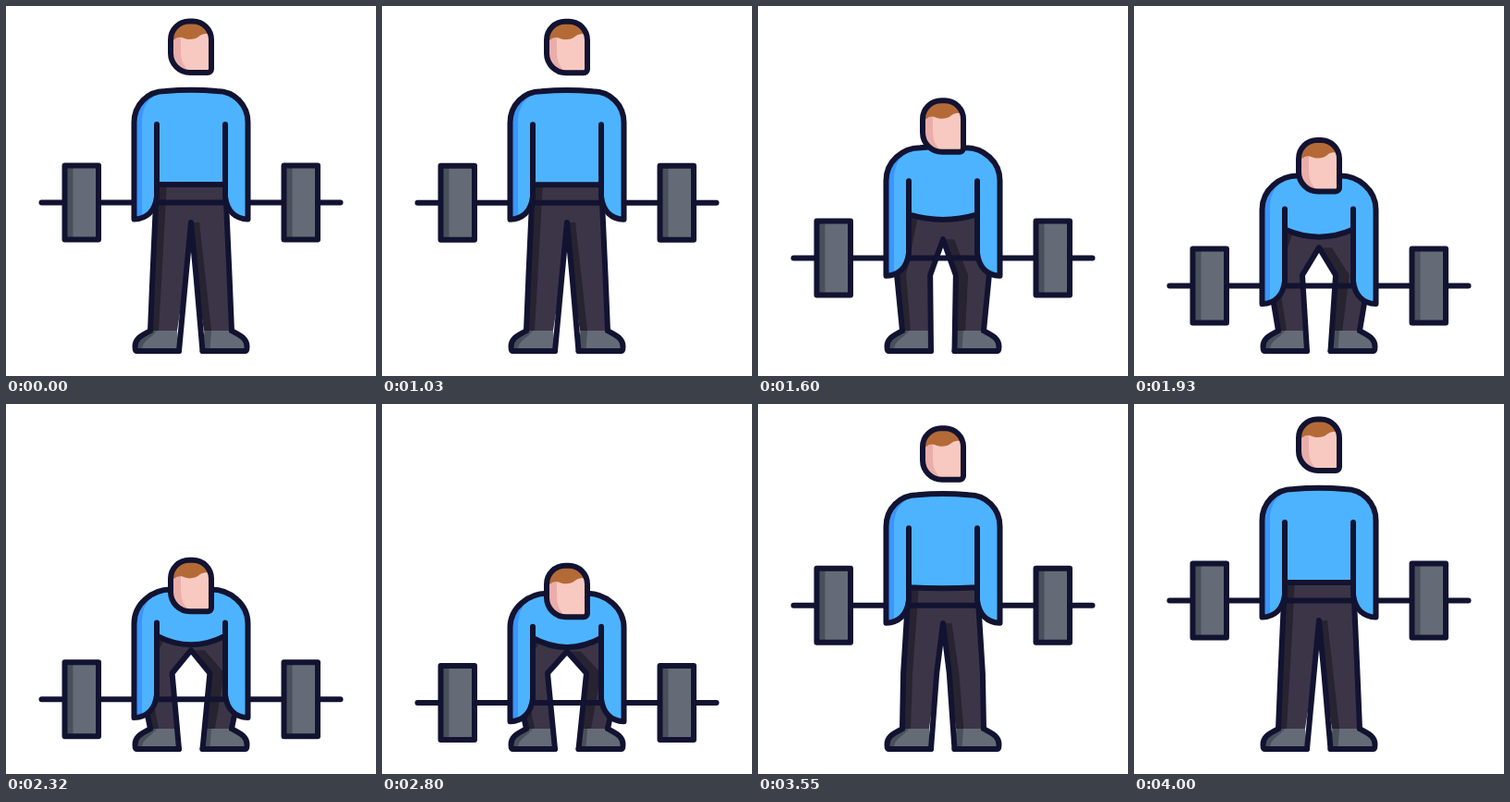
These frames come from a looping animation (400 px wide and 400 px high, 4.03 s). An HTML page:

```html
<!DOCTYPE html>
<html lang="en">
<head>
<meta charset="utf-8">
<title>Deadlift</title>
<style>
  html, body { margin: 0; width: 100%; height: 100%; overflow: hidden; background: #fff; }
  svg { display: block; width: 100vw; height: 100vh; }
  .ink { fill: none; stroke: #121331; stroke-width: 6; stroke-linecap: round; stroke-linejoin: round; }
  .trousers { fill: #3c3548; }
  .fold { fill: #272330; }
  .metal { fill: #656b76; }
  .metal-dark { fill: #4a505a; }
</style>
</head>
<body>
<svg viewBox="0 0 400 400">
  <defs>
    <g id="plate">
      <path class="metal" d="M0 0H36.5V80H0Z"/>
      <path class="metal-dark" d="M0 0H9V80H0Z"/>
      <path class="ink" d="M0 0H36.5V80H0Z"/>
    </g>
    <path id="skull" d="M198 16.500h4a20 20 0 0 1 20 20v31.500a4 4 0 0 1-4 4h-19a21 21 0 0 1-21-21v-14.500a20 20 0 0 1 20-20Z"/>
    <clipPath id="headClip"><use href="#skull"/></clipPath>
  </defs>

  <path id="legs" class="trousers"/>
  <path id="folds" class="fold"/>
  <path class="metal" d="M156 351C147 356 139.500 359 139.500 368Q139.500 373 141 373H187L185 351ZM244 351C253 356 260.500 359 260.500 368Q260.500 373 259 373H212.500L214.500 351Z"/>
  <path class="metal-dark" d="M156 351C147 356 139.500 359 139.500 368V373H147C147 361 157 360 163 351ZM214.500 351H222L220.500 373H212.500Z"/>
  <path id="legLines" class="ink"/>
  <path class="ink" d="M156 351C147 356 139.500 359 139.500 368Q139.500 373 141 373H187M244 351C253 356 260.500 359 260.500 368Q260.500 373 259 373H212.500"/>

  <g id="barbell">
    <path class="ink" d="M38.500 212.500H361.500"/>
    <use href="#plate" x="63.500" y="172.500"/>
    <use href="#plate" x="300.500" y="172.500"/>
  </g>

  <g id="body">
    <path id="shirt" fill="#4db3ff"/>
    <path id="shirtShade" fill="#3b95ff"/>
    <path id="shirtLine" class="ink"/>
  </g>

  <g id="head">
    <g clip-path="url(#headClip)">
      <path fill="#f8c9c0" d="M175 13H225V75H175Z"/>
      <path fill="#e9aeaa" d="M175 13H189V50Q189 65 200 72H175Z"/>
      <path fill="#b46a36" d="M175 13H225V33C218 29 213 29 209 32.500C203 37.500 196 36.500 190 34Q185 33 181 37L175 40Z"/>
    </g>
    <use href="#skull" class="ink"/>
  </g>
</svg>
<script>
const LOOP = 4030;
const el = Object.fromEntries([...document.querySelectorAll('svg [id]')].map(n => [n.id, n]));
const draw = (id, d) => el[id].setAttribute('d', d);
const shift = (id, y) => el[id].setAttribute('transform', `translate(0 ${y.toFixed(3)})`);
const mirror = x => 400 - x;

// Cubic Bezier easing with flat ends; x1 and x2 are the handle lengths.
function ease(u, x1, x2) {
  if (u <= 0) return 0;
  if (u >= 1) return 1;
  let lo = 0, hi = 1, s = 0.5;
  for (let i = 0; i < 24; i++) {
    s = (lo + hi) / 2;
    const x = 3 * (1 - s) ** 2 * s * x1 + 3 * (1 - s) * s * s * x2 + s ** 3;
    if (x < u) lo = s; else hi = s;
  }
  return s * s * (3 - 2 * s);
}

const lowering = t => ease((t - 1000) / 1700, 0.25, 0.3);
const lifting = t => ease((t - 2760) / 960, 0.626, 0.538);

function drawLegs(bend) {
  const crotch = 234 + 33.5 * bend;
  const hip = 190 + 60 * bend;
  const inner = 194.6 - 15.6 * bend;
  const outer = 158.5 - 15.5 * bend;
  const leftOut = `163 ${hip}L${outer} 291L156 351`;
  const rightOut = `237 ${hip}L${mirror(outer)} 291L244 351`;
  const leftIn = `187 373L${inner} 291L200 ${crotch}`;
  const rightIn = `L${mirror(inner)} 291L212.5 373`;

  draw('legs', `M${leftOut}L185 351L${inner} 291L200 ${crotch}L${mirror(inner)} 291L214.5 351H244L${mirror(outer)} 291L237 ${hip}Z`);
  draw('folds', `M${leftOut}H165L${outer + 10} 291L174 ${hip}Z
    M200 ${crotch}H${209 + 6 * bend}L${mirror(inner) + 10 + 6 * bend} 291L${222 + 4 * bend} 351H214L${mirror(inner)} 291Z`);
  draw('legLines', `M${leftOut}M${leftIn}${rightIn}M${rightOut}`);
}

function drawBody(bend, waist) {
  const drop = 113 * bend;
  const hem = 193 + 60 * waist - drop;
  const dip = 193 + 80 * waist - drop;
  // Shoulders grow rounder as the body leans forward.
  const arm = 126 + 3 * bend;
  const neck = 172 + 6 * bend;
  const shirt = `M138.5 230.5V${arm}C138.5 107 ${neck - 19} 92 ${neck} 92Q200 89.5 ${mirror(neck)} 92
    C${mirror(neck - 19)} 92 261.5 107 261.5 ${arm}V230.5
    C248 230 239 222 237 206V${hem}Q200 ${dip} 163 ${hem}V206C161 222 152 230 138.5 230.5Z`;
  draw('shirt', shirt);
  draw('shirtShade', `M138.5 230.5V${arm}C138.5 107 ${neck - 19} 92 ${neck} 92C155 97 147 108 147 ${arm}V228Z`);
  draw('shirtLine', `${shirt}M163 128V${hem}M237 128V${hem}`);
  shift('body', drop);
}

// On the way up the bar and shoulders lead while the legs follow.
const bendAt = (t, lead) => lowering(t) - lifting(t + lead);

function render(t) {
  const legBend = bendAt(t, -30);
  drawLegs(legBend);
  drawBody(bendAt(t, 8), legBend);
  shift('head', 158.5 * bendAt(t, 0));
  shift('barbell', 111 * bendAt(t, 20));
}

const start = performance.now();
function tick() {
  render((performance.now() - start) % LOOP);
  requestAnimationFrame(tick);
}
tick();
</script>
</body>
</html>
```
